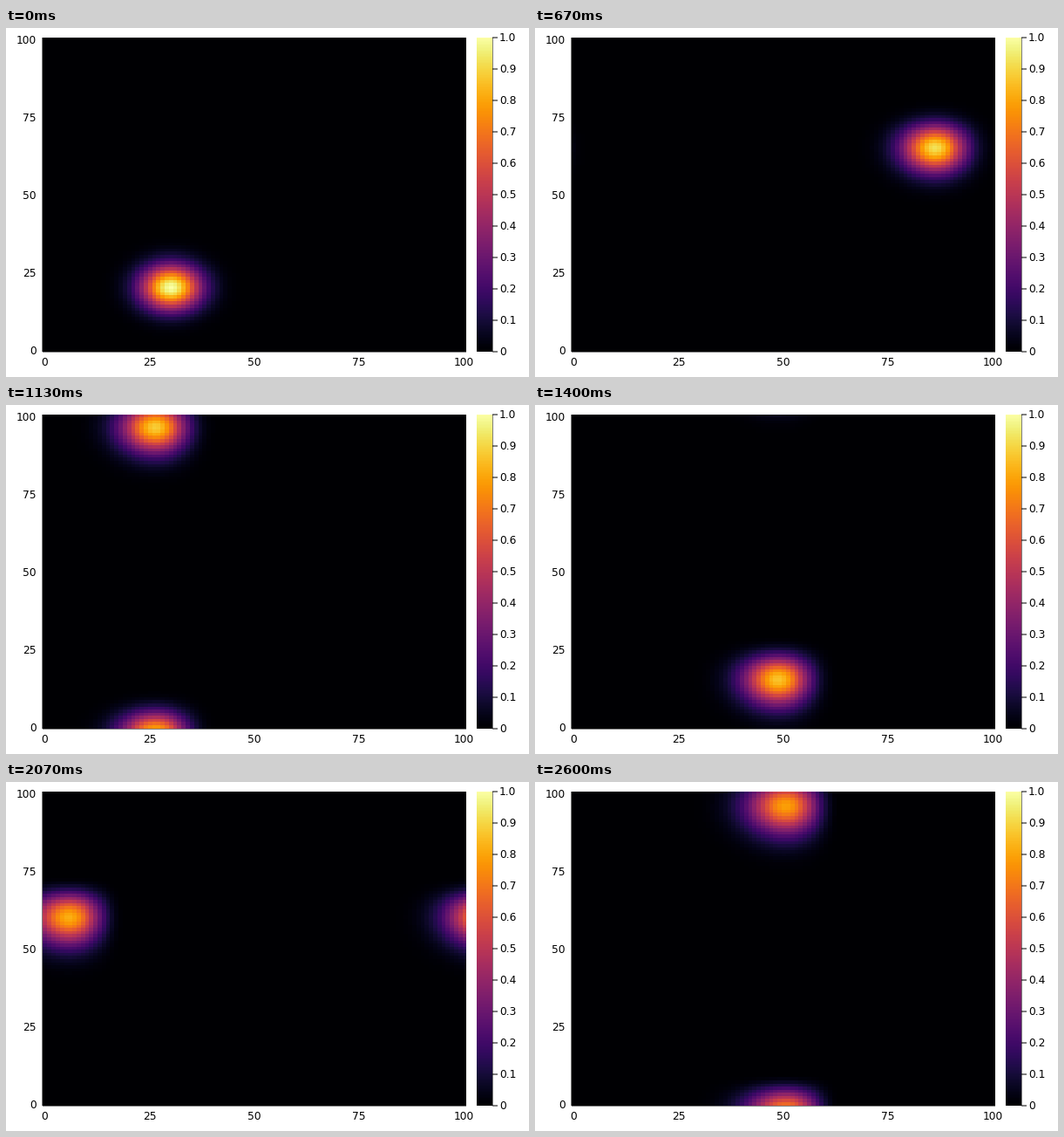
A matplotlib script for the animation above (2.67 s loop, 600 px wide and 400 px high).

```python
import numpy as np
import matplotlib.pyplot as plt
from matplotlib.animation import FuncAnimation
from matplotlib.patches import Rectangle

WIDTH, HEIGHT = 600, 400
TICK_MS, LOOP_MS = 10, 2670
STEPS_PER_TICK = 0.15        # 15 pictures per second, on a 10 ms clock
CELLS, PERIOD = 101, 99      # the outer cells repeat the opposite side
START = (30, 20)
SPEED = (5.6, 4.48)          # cells per step
SIGMA = 5.0
LEFT, RIGHT, TOP, BOTTOM = 42, 528, 11, 371
BAR_LEFT, BAR_RIGHT = 540, 558
PX = 0.72                    # one pixel in points

WAVES = 2 * np.pi * np.fft.rfftfreq(PERIOD)
WRAP = np.arange(CELLS) % PERIOD


def profile(start, speed, n):
    """Periodic pulse that widens and grows a tail behind it."""
    var = SIGMA**2 * (1 + 0.016 * n**0.72)
    skew = -2.2 * n
    mean = start + speed * n + 0.45 * skew / var
    q = -1j * WAVES
    spectrum = np.exp(q * mean + q**2 * var / 2 + q**3 * skew / 6)
    pulse = SIGMA * np.sqrt(2 * np.pi) * np.fft.irfft(spectrum, PERIOD)
    return pulse[WRAP]


def enlarge(cells, width):
    """Nearest-cell enlargement to whole pixels."""
    rows = np.arange(BOTTOM - TOP) * cells.shape[0] // (BOTTOM - TOP)
    cols = np.arange(width) * cells.shape[1] // width
    return cells[np.ix_(rows, cols)]


def field(n):
    x, y = (profile(s, v, n) for s, v in zip(START, SPEED))
    return enlarge(np.clip(np.outer(y, x), 0, 1), RIGHT - LEFT)


fig = plt.figure(figsize=(WIDTH / 100, HEIGHT / 100), dpi=100,
                 facecolor="white")
ax = fig.add_axes([0, 0, 1, 1])
ax.axis("off")
ax.set_xlim(0, WIDTH)
ax.set_ylim(HEIGHT, 0)


def picture(data, left):
    return fig.figimage(data, left, HEIGHT - BOTTOM, origin="lower",
                        cmap="inferno", vmin=0, vmax=1)


def label(x, y, text, ha):
    ax.text(x, y + 4.4, text, ha=ha, va="baseline", color="black",
            family="DejaVu Sans", size=12.2 * PX)


def hline(x0, x1, y):
    ax.add_patch(Rectangle((x0, y - 0.5), x1 - x0, 1, color="black", lw=0,
                           snap=False))


def vline(x, y0, y1):
    ax.add_patch(Rectangle((x - 0.5, y0), 1, y1 - y0, color="black", lw=0,
                           snap=False))


heat = picture(field(0), LEFT)
ramp = np.linspace(0, 1, 256)[:, None]
picture(enlarge(ramp, BAR_RIGHT - BAR_LEFT), BAR_LEFT)

vline(LEFT, TOP, BOTTOM)
hline(LEFT, RIGHT, BOTTOM)
for value in range(0, 101, 25):
    part = (value + 0.5) / CELLS
    label(LEFT + (RIGHT - LEFT) * part, 382.6, str(value), "center")
    label(34.5, BOTTOM + 0.6 - (BOTTOM - TOP) * part, str(value), "right")

vline(BAR_RIGHT, TOP, BOTTOM)
for i in range(11):
    y = BOTTOM - 36 * i
    hline(BAR_RIGHT, BAR_RIGHT + 6, y)
    label(566, y - 0.3, f"{i / 10:.1f}" if i else "0", "left")


def update(tick):
    heat.set_data(field(int((tick + 0.5) * STEPS_PER_TICK)))
    return [heat]


anim = FuncAnimation(fig, update, frames=LOOP_MS // TICK_MS,
                     interval=TICK_MS, repeat=True, repeat_delay=0)
plt.show()
```
